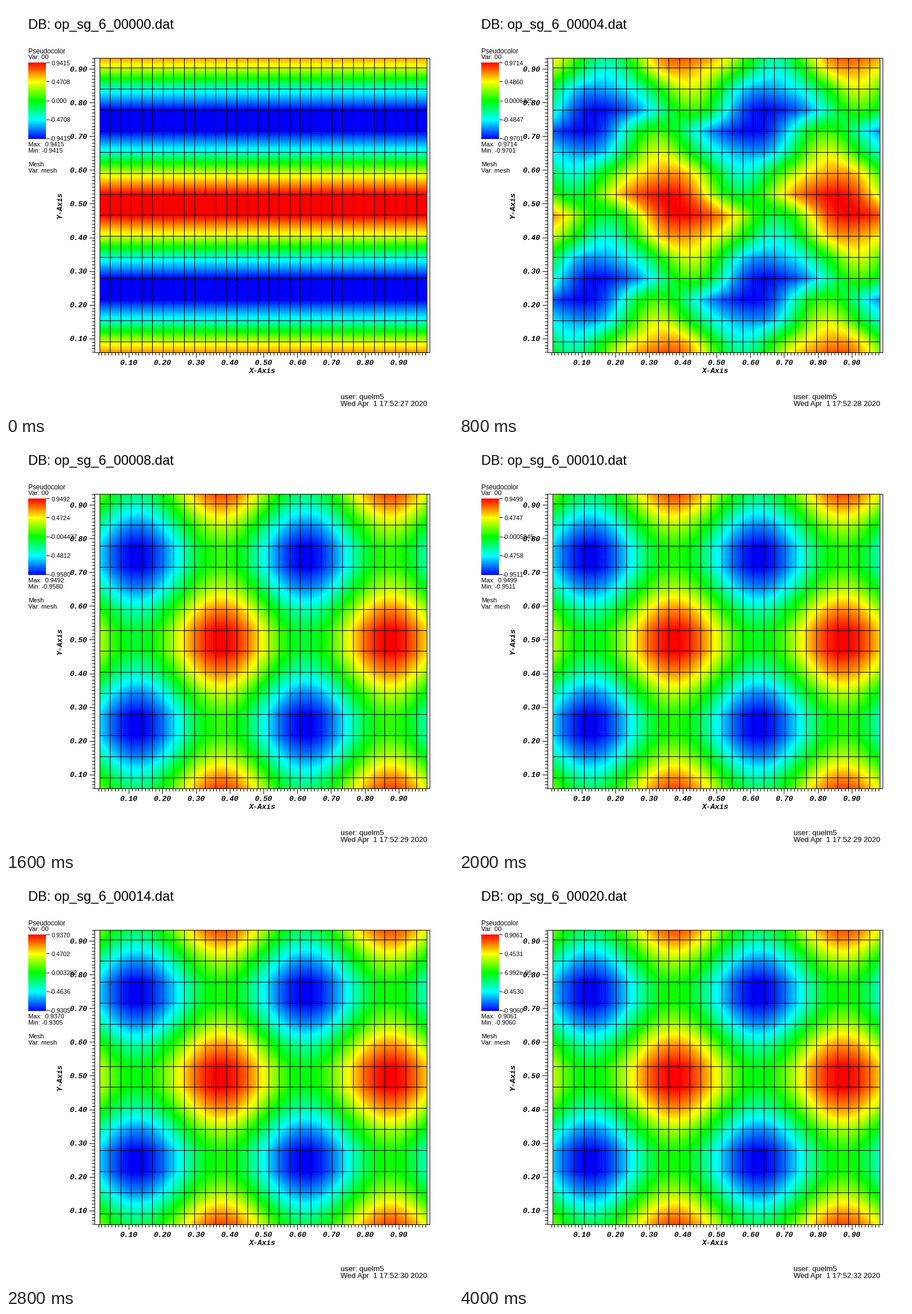
Write a matplotlib script that moves like this. It is 783x715 px and loops after 4.2 s.

```python
import numpy as np
import matplotlib.pyplot as plt
from matplotlib.animation import FuncAnimation
from matplotlib.colors import LinearSegmentedColormap

W, H, DPI = 783, 715, 100
FRAMES, INTERVAL = 21, 200
LEFT, RIGHT, TOP, BOTTOM = 164, 737, 91, 607
DX, DY, ROW1 = 18.484, 36.92, 588

# Legend limits at a few steps; the steps between are interpolated.
LIMIT_STEPS = [0, 2, 4, 8, 12, 16, 20]
HIGH = [0.94154, 1.071203, 0.97136, 0.94916, 0.95071, 0.92333, 0.90611]
LOW = [-0.94154, -1.123797, -0.970075, -0.958014, -0.944194, -0.916716, -0.90597016]

# Strength of each part of the flow: bands roll up, then settle into vortices.
FLOW_STEPS = [0, 2, 4, 8, 12]
FLOW = dict(bands=[1, 0.75, 0.5, 0.47, 0.5],
            waves=[0, 0.2, 0.5, 0.53, 0.5],
            twist=[0, 0.08, 0.05, 0, 0],
            streaks=[0, 1.7, 0, 0, 0],
            ripple=[0, 0, 0.12, 0, 0])

# Mesh nodes sit at the cell centres of the periodic unit square.
X, Y = np.meshgrid((np.arange(32) + 0.5) / 32, (np.arange(16) + 0.5) / 16)


def streak(x, y):
    """Tilted Gaussian about (1/8, 1/2), repeated every half unit."""
    dx = (x + 0.125) % 0.5 - 0.25
    dy = (y + 0.25) % 0.5 - 0.25
    along, across = 0.62 * dx + 0.78 * dy, 0.78 * dx - 0.62 * dy
    return np.exp(-0.5 * ((along / 0.083) ** 2 + (across / 0.037) ** 2))


def mesh_values(step):
    part = {name: np.interp(step, FLOW_STEPS, keys) for name, keys in FLOW.items()}
    k = 4 * np.pi
    shift = part["twist"] * (np.sin(k * Y) + 0.5 * np.sin(3 * k * Y))
    values = (part["bands"] * np.cos(k * Y)
              - part["waves"] * np.sin(k * (X + shift))
              + part["streaks"] * (streak(-X, Y - 0.25) - streak(X, Y))
              - part["ripple"] * np.sin(2 * k * X) * np.sin(2 * k * Y))
    return values / np.abs(values).max()


U, V = np.meshgrid((np.arange(LEFT, RIGHT) - LEFT) / DX,
                   1 + (ROW1 - np.arange(TOP, BOTTOM)) / DY)
COL, ROW = np.floor(U).astype(int), np.floor(V).astype(int)
FX, FY = U - COL, V - ROW


def field(step):
    """Linear interpolation on mesh cells split into two triangles."""
    grid = mesh_values(step)

    def corner(dx, dy):
        return grid[(ROW + dy) % 16, (COL + dx) % 32]

    f00, f10, f01, f11 = corner(0, 0), corner(1, 0), corner(0, 1), corner(1, 1)
    lower = f00 + FX * (f10 - f00) + FY * (f01 - f00)
    upper = f11 + (1 - FX) * (f01 - f11) + (1 - FY) * (f10 - f11)
    return np.where(FX + FY <= 1, lower, upper)


fig = plt.figure(figsize=(W / DPI, H / DPI), dpi=DPI, facecolor="white")
ax = fig.add_axes([0, 0, 1, 1])
ax.set_axis_off()
hot = LinearSegmentedColormap.from_list(
    "hot_scale", ["blue", "cyan", "lime", "yellow", "red"], N=256)


def image(data, extent):
    return ax.imshow(data, cmap=hot, vmin=-1, vmax=1, extent=extent,
                     aspect="auto", interpolation="nearest")


def segments(lines):
    """One-pixel lines; snapping moves them to pixel centres."""
    xs, ys = [], []
    for x0, y0, x1, y1 in lines:
        xs += [x0, x1, np.nan]
        ys += [y0, y1, np.nan]
    ax.plot(xs, ys, color="black", lw=72 / DPI, snap=True, solid_capstyle="butt")


def label(x, y, text="", size=11.2, **style):
    style = {"family": "Liberation Sans", "va": "baseline", **style}
    return ax.text(x, y, text, fontsize=size * 72 / DPI, color="black", **style)


plot = image(field(0), (LEFT, RIGHT, BOTTOM, TOP))
image(np.linspace(1, -1, 256)[:, None], (39, 70, 233, 99))
ax.set_xlim(0, W)
ax.set_ylim(H, 0)

# Mesh, box and axes
segments([(LEFT + DX * i, TOP, LEFT + DX * i, BOTTOM) for i in range(32)])
segments([(LEFT, ROW1 - DY * j, RIGHT, ROW1 - DY * j) for j in range(14)])
segments([(155, TOP, 742, TOP), (155, BOTTOM, 742, BOTTOM),
          (155, TOP, 155, BOTTOM), (742, TOP, 742, BOTTOM)])


def x_px(x):
    return 155.6 + 591.2 * x


def y_px(y):
    return 641.8 - 590.7 * y


def tick_length(n):
    return 9 if n % 10 == 0 else 5


segments([(x_px(n / 100), BOTTOM, x_px(n / 100), BOTTOM + tick_length(n))
          for n in range(1, 99)])
segments([(155 - tick_length(n), y_px(n / 100), 155, y_px(n / 100))
          for n in range(6, 94)])

mono = dict(size=13, family="Liberation Mono", weight="bold", style="italic")
for n in range(1, 10):
    label(x_px(n / 10), 629, f"{n / 10:.2f}", ha="center", **mono)
    label(142, y_px(n / 10) + 4.5, f"{n / 10:.2f}", ha="right", **mono)
label(448.5, 643, "X-Axis", ha="center", **mono)
label(95, 349, "Y-Axis", ha="center", rotation=90, **{**mono, "va": "center"})

# Legend and captions
LEGEND_Y = np.linspace(99, 232, 5)
segments([(70, y, 76, y) for y in LEGEND_Y])
scale_labels = [label(80, y + 4.5, size=10.9) for y in LEGEND_Y]
label(39, 83, "Pseudocolor", 11.6)
label(39, 93, "Var: 00")
max_label, min_label = label(39, 246, size=10.9), label(39, 257, size=10.9)
label(39, 281, "Mesh")
label(39, 292, "Var: mesh")
title = label(39, 40, size=23.6)
label(586, 689, "user: quelm5", 13.1)
stamp = label(586, 701.5, size=13.1)


def number(value):
    return f"{value:#.4g}"


def update(step):
    high, low = np.interp(step, LIMIT_STEPS, HIGH), np.interp(step, LIMIT_STEPS, LOW)
    plot.set_data(field(step))
    for text, value in zip(scale_labels, np.linspace(high, low, 5)):
        text.set_text(number(value))
        text.set_x(76.5 if value < 0 else 80)
    max_label.set_text(f"Max:  {number(high)}")
    min_label.set_text(f"Min: {number(low)}")
    title.set_text(f"DB: op_sg_6_{step:05d}.dat")
    stamp.set_text(f"Wed Apr  1 17:52:{27 + 5 * step // 19} 2020")
    return [plot, title, stamp, max_label, min_label, *scale_labels]


animation = FuncAnimation(fig, update, frames=FRAMES, interval=INTERVAL,
                          repeat=True, repeat_delay=0, blit=False)
plt.show()
```
